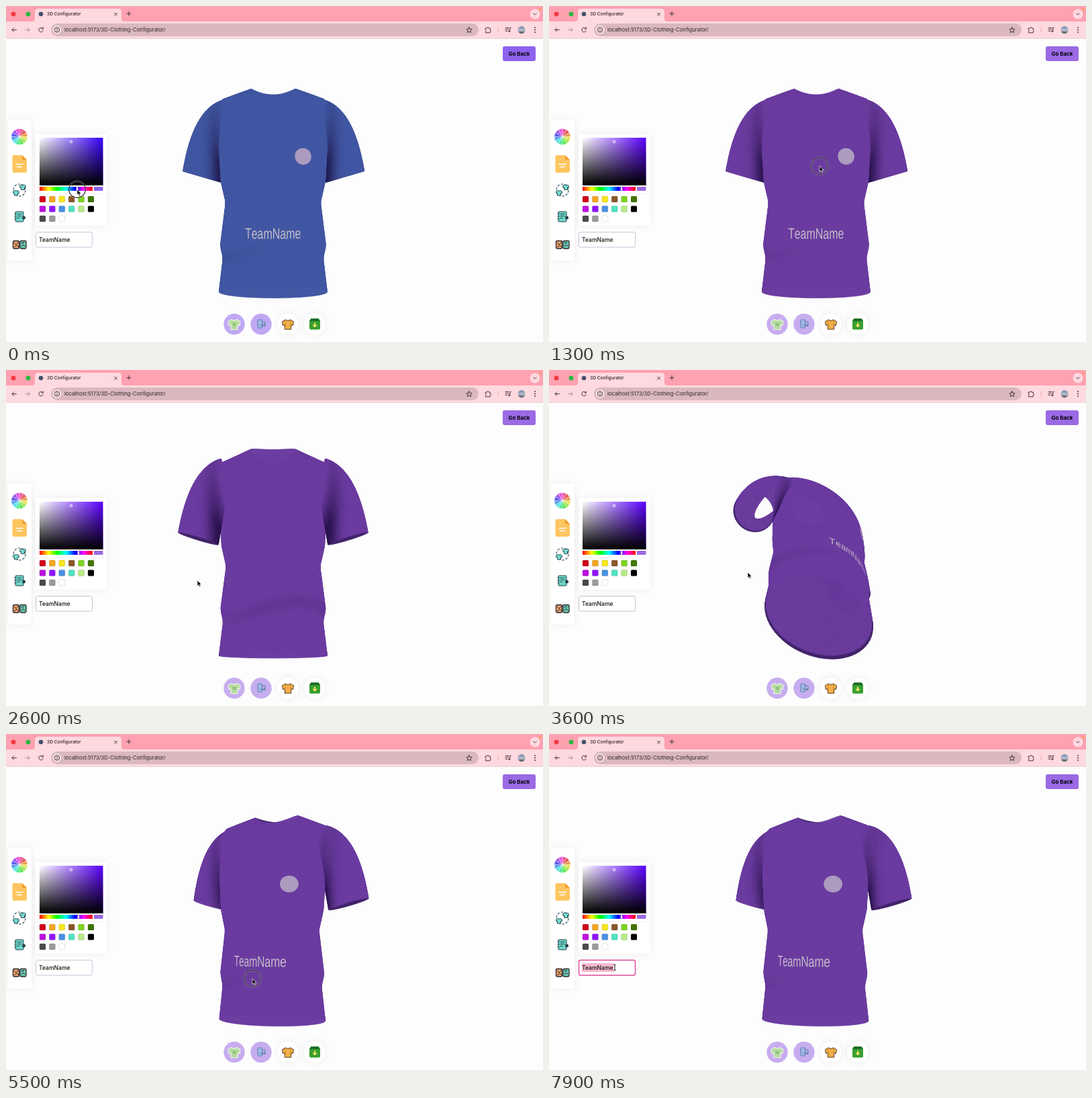
Write an HTML page with a canvas that moves like this. It is 800 px wide and 500 px high and loops after 8000 ms.

```html
<!DOCTYPE html>
<html lang="en">
<head>
<meta charset="utf-8">
<title>3D Configurator</title>
<style>
  html, body { margin: 0; width: 100%; height: 100%; overflow: hidden; background: #fdfdfd; }
  canvas, svg { position: absolute; left: 0; top: 0; width: 800px; height: 500px; }
  svg { font-family: Inter, Roboto, sans-serif; }
  .line { fill: none; stroke: #4a3438; stroke-linecap: round; stroke-linejoin: round; }
  .card { fill: #fff; filter: drop-shadow(0 0 5px rgba(0, 0, 0, .07)); }
  .theme { fill: var(--theme); }
</style>
</head>
<body>
<canvas id="stage" width="800" height="500"></canvas>
<svg viewBox="0 0 800 500" xmlns="http://www.w3.org/2000/svg">
  <defs>
    <linearGradient id="white"><stop stop-color="#fff"/><stop offset="1" stop-color="#fff" stop-opacity="0"/></linearGradient>
    <linearGradient id="black" x2="0" y2="1"><stop stop-opacity="0"/><stop offset="1"/></linearGradient>
    <linearGradient id="hues">
      <stop stop-color="#f00"/><stop offset=".17" stop-color="#ff0"/><stop offset=".33" stop-color="#0f0"/>
      <stop offset=".5" stop-color="#0ff"/><stop offset=".67" stop-color="#00f"/><stop offset=".83" stop-color="#f0f"/>
      <stop offset="1" stop-color="#f00"/>
    </linearGradient>
    <linearGradient id="photo" x2="0" y2="1"><stop stop-color="#6f86a8"/><stop offset=".55" stop-color="#b9c0cc"/><stop offset="1" stop-color="#3c4350"/></linearGradient>
    <path id="tee" d="M-4-7L-9-4-8 2-5 1V8H5V1L8 2 9-4 4-7Q0-4-4-7Z"/>
  </defs>

  <!-- browser -->
  <rect width="800" height="24" fill="#fea1b1"/>
  <rect y="23" width="800" height="25.5" fill="#fed9df"/>
  <rect y="48.2" width="800" height=".8" fill="#e4ccd1"/>
  <path d="M39 23Q43 23 43 19V9Q43 4 48 4H167Q172 4 172 9V19Q172 23 176 23Z" fill="#fed9df"/>
  <circle cx="11" cy="12" r="3.5" fill="#f03c40"/>
  <circle cx="22" cy="12" r="3.5" fill="#f7a4a6"/>
  <circle cx="33" cy="12" r="3.5" fill="#2cb83f"/>
  <circle cx="52" cy="12" r="3.3" fill="#43506a"/>
  <text x="61" y="14.4" font-size="6.6" font-weight="500" fill="#2b2023">3D Configurator</text>
  <path class="line" d="M161.5 10.2l4 4m0-4l-4 4M180 11.5h6m-3-3v6"/>
  <circle cx="788" cy="12" r="7.5" fill="#fed9df"/>
  <path class="line" d="M785.8 11l2.2 2.2 2.2-2.2"/>
  <circle cx="796" cy="5" r="1.5" fill="#f4a13e"/>
  <rect x="67" y="26" width="637" height="19" rx="9.5" fill="#dab8bf"/>
  <path class="line" d="M15.5 35.5H9m3-3-3 3 3 3"/>
  <path class="line" d="M28.5 35.5H35m-3-3 3 3-3 3" opacity=".45"/>
  <path class="line" d="M54.8 33.5a3.3 3.3 0 1 0 .5 3M55.3 31.8v2.2h-2.3"/>
  <circle cx="76" cy="35.5" r="6.5" fill="#f3dde1"/>
  <circle class="line" cx="76" cy="35.5" r="3.6"/>
  <path class="line" d="M76 35.2v2M76 33.5v.1"/>
  <text x="87" y="38.3" font-size="7.7" fill="#30262a">localhost:5173/3D-Clothing-Configurator/</text>
  <path class="line" d="M690 31.6l1.2 2.7 2.9.3-2.2 2 .7 2.9-2.6-1.5-2.6 1.5.7-2.9-2.2-2 2.9-.3z"/>
  <path class="line" d="M714.5 33h2.3a1.2 1.2 0 1 1 2.4 0h2v2.4a1.2 1.2 0 1 1 0 2.4v2h-6.7v-2a1.3 1.3 0 0 0 0-2.5z"/>
  <rect x="732.6" y="31" width="1" height="9" fill="#f5a9b5"/>
  <path class="line" d="M744 32.5h5m-5 2.4h5m-5 2.4h2.7M750.8 37.6v-5.3h1.6"/>
  <circle cx="749.7" cy="37.7" r="1.3" fill="#4a3438"/>
  <circle cx="768" cy="35.5" r="5.6" fill="url(#photo)"/>
  <path class="line" stroke-width="2" d="M788 32v0M788 35.5v0M788 39v0"/>

  <rect class="theme" x="740" y="60" width="49" height="22" rx="3"/>
  <text x="764.4" y="74" font-size="7.9" font-weight="700" text-anchor="middle">Go Back</text>

  <!-- tool bar -->
  <rect class="card" x="3" y="169" width="35" height="210" rx="4"/>
  <g id="wheel" stroke="#fff" stroke-width=".4"></g>
  <path d="M12 222H24L31 229V245Q31 248 28 248H12Q9.500 248 9.500 245V225Q9.500 222 12 222Z" fill="#fdc55f"/>
  <path d="M24 222L31 229H26Q24 229 24 227Z" fill="#f29b2c"/>
  <path d="M15 235.500H25M16.500 239.500H23" stroke="#fff" stroke-width="1.7" stroke-linecap="round"/>
  <circle cx="20" cy="274" r="9" fill="none" stroke="#37555f" stroke-width="1.2" stroke-dasharray="3.5 2.2"/>
  <g fill="#72dccd" stroke="#24404b" stroke-width="1.8">
    <use href="#tee" transform="translate(15 278) scale(.5)"/><use href="#tee" transform="translate(25 269.5) scale(.5)"/>
  </g>
  <rect x="14" y="306" width="12" height="15" rx="1" fill="#6fd8c8" stroke="#23414d"/>
  <path d="M16.500 309.500h7m-7 3h7m-7 3h4M12.500 309h3m-3 4h3m-3 4h3" stroke="#23414d"/>
  <circle cx="26.5" cy="315" r="2.5" fill="#23414d"/>
  <rect x="10.5" y="349.5" width="9" height="11.5" rx="1.5" fill="#e9a36e" stroke="#2a2529" stroke-width="1.3"/>
  <rect x="21" y="349.5" width="9" height="11.5" rx="1.5" fill="#69c8b1" stroke="#2a2529" stroke-width="1.3"/>
  <path d="M12 352l3 3 4-4m-7 8l4-3 3 3M23 358l2.500-3 3 3M23 352.500h4" fill="none" stroke="#2a2529"/>

  <!-- colour picker -->
  <rect class="card" x="44" y="190.5" width="107" height="136.5" rx="3"/>
  <g id="field-colour">
    <rect x="50" y="196" width="94.5" height="71" fill="var(--hue)"/>
    <rect x="50" y="196" width="94.5" height="71" fill="url(#white)"/>
    <rect x="50" y="196" width="94.5" height="71" fill="url(#black)"/>
  </g>
  <circle cx="97" cy="202" r="1.7" fill="none" stroke="#fff"/>
  <rect x="50" y="269" width="79" height="6" fill="url(#hues)"/>
  <rect class="theme" x="131" y="269" width="13.5" height="6" rx="1"/>
  <rect id="knob" y="269.3" width="2.4" height="5.4" rx=".6" fill="#fff" stroke="#777" stroke-width=".3"/>
  <rect x="44" y="279" width="107" height=".7" fill="#eee"/>
  <g id="presets"></g>

  <rect id="field" x="44.5" y="336.5" width="84" height="22.5" rx="2.5" fill="#fff"/>
  <rect id="selection" x="49" y="341" width="47.5" height="13" fill="#f8bad2"/>
  <text x="49" y="350.7" font-size="8.6" font-weight="500" fill="#111">TeamName</text>

  <!-- bottom buttons -->
  <g opacity=".54"><circle class="theme" cx="340" cy="473.5" r="15.7"/><circle class="theme" cx="380" cy="473.5" r="15.7"/></g>
  <circle class="card" cx="420" cy="473.5" r="15.7"/><circle class="card" cx="460" cy="473.5" r="15.7"/>
  <use href="#tee" transform="translate(340 473.5)" fill="#b4dc9c" stroke="#eef4e8" stroke-width="1.2"/>
  <text x="340" y="475.5" font-size="5" text-anchor="middle" fill="#4c7a44">10</text>
  <rect x="375" y="467" width="6.5" height="12" rx="1" fill="#a2b9e4" stroke="#587cae"/>
  <path d="M381 470h5v6h-4m-4-1h8m-2-2 2 2-2 2" fill="none" stroke="#54839c"/>
  <use href="#tee" transform="translate(420 473.5) scale(.95)" fill="#f3b04a" stroke="#4a3524"/>
  <path d="M416 467v13m8-13v13" stroke="#c9791a" stroke-width=".8"/>
  <path d="M454.500 465h11l2.500 4v10.500q0 2-2 2h-12q-2 0-2-2V469z" fill="#37a02f"/>
  <path d="M454.500 465h11l2.500 4h-16z" fill="#1f6e25"/>
  <path d="M460 471v6m-2.700-2.500 2.700 2.700 2.700-2.700" fill="none" stroke="#ffe46b" stroke-width="1.7"/>

  <!-- pointer -->
  <g id="pointer">
    <g id="ring" fill="none"><circle r="12.3" stroke="#fff" stroke-width="2.6" opacity=".35"/><circle r="12.3" stroke="#2b2530" stroke-width="1.2"/></g>
    <path id="arrow" d="M0 0V8.500L2 6.700 3.400 9.700 4.900 9 3.500 6.200H6.200Z" fill="#000" stroke="#fff" stroke-width=".7"/>
    <path id="beam" d="M-1.800-4.500Q0-4.500 0-3.300Q0-4.500 1.800-4.500M0-3.500V3.500M-1.800 4.500Q0 4.500 0 3.300Q0 4.500 1.800 4.500" fill="none" stroke="#111" stroke-width=".9"/>
  </g>
</svg>

<script>
const $ = id => document.getElementById(id);
const ctx = $('stage').getContext('2d');
const LOOP = 8000, STEP = 100, TAU = 2 * Math.PI;
const CENTRE = [398, 280], EYE = 1000;
const NECK = 121, HEM = 424;

const lerp = (a, b, k) => a + (b - a) * k;
const mix = (a, b, k) => a.map((v, i) => lerp(v, b[i], k));
const rgb = c => `rgb(${c.map(Math.round)})`;
const bump = (x, size) => Math.exp(-((x / size) ** 2));

// Each beat changes some of the state; the rest carries over.
const beats = [{ t: 0, x: 106, y: 273, down: 1, yaw: -1, tilt: 0 }];
const at = (t, change = {}) => beats.push({ ...beats[beats.length - 1], ...change, t });
at(400, { x: 108, down: 0 });
at(1200, { x: 403, y: 238, down: 1 });
at(1300);
at(1800, { x: 288, yaw: -91, down: 0 });
at(2000, { x: 400, y: 300, down: 1 });
at(2500, { x: 285, y: 313, yaw: -180, tilt: 5, down: 0 });
at(2700);
at(2900, { x: 425, y: 375, down: 1 });
at(3500, { x: 296, y: 301, yaw: -313, tilt: 55, down: 0 });
at(3600);
at(3800, { x: 425, y: 330, down: 1 });
at(4300, { x: 349, y: 340, yaw: -372, tilt: 38 });
at(5500, { x: 367, y: 364, yaw: -379, tilt: 0 });
at(5800, { yaw: -378, down: 0 });
at(6000);
at(6900, { x: 98, y: 347.5 });
at(7200, { down: 1 });
at(7300, { down: 0 });
at(LOOP);

function stateAt(t) {
  const i = beats.findIndex(b => b.t > t), a = beats[i - 1], b = beats[i];
  const k = (t - a.t) / (b.t - a.t), e = k * k * (3 - 2 * k);
  const s = { down: a.down };
  for (const key of ['x', 'y', 'yaw', 'tilt']) s[key] = lerp(a[key], b[key], e);
  return s;
}

// Half width of the torso at a few heights.
const waist = [[NECK, 34], [140, 80], [212, 80], [262, 77], [292, 70], [356, 78], [374, 74], [HEM + 1, 80]];

function torsoRing(y) {
  const i = Math.max(1, waist.findIndex(p => p[0] > y));
  const [y0, w0] = waist[i - 1], [y1, w1] = waist[i];
  const neck = Math.exp((NECK - y) / 30);
  return { w: lerp(w0, w1, (y - y0) / (y1 - y0)), d: 62 - 38 * neck, z: 6 - 24 * neck };
}

// Surfaces take an angle and a position from top to hem; they return x, y, z, shade.
function torso(a, v) {
  const y = lerp(NECK, HEM, v), r = torsoRing(y), s = Math.sin(a);
  const dip = Math.max(0, 1 - (y - NECK) / 30) * s * s * (s > 0 ? 12 : 5);
  const fold = bump(y - 358 - 12 * Math.cos(2 * a + 1), 9) * (.5 - .5 * Math.sin(a + .6));
  return [r.w * Math.cos(a), y + dip, r.z + r.d * s, .14 * fold];
}

const sleeve = side => (a, v) => {
  const out = side * Math.cos(a), u = 1 - v;
  const outer = [76 * u * u + 244 * u * v + 138 * v * v, 137 * u * u + 298 * u * v + 245 * v * v];
  const inner = [lerp(70, 80, v), lerp(200, 262, v)];
  const [x, y] = mix(inner, outer, (1 + out) / 2);
  const shade = .75 * bump(x - 78, 14) * Math.min(1, 1.6 * v);
  return [side * x, y, -24 + lerp(45, 31, v) * Math.sin(a), shade];
};

function camera({ yaw, tilt }) {
  const [cy, sy, ct, st] = [yaw, tilt].flatMap(d => [Math.cos(d * TAU / 360), Math.sin(d * TAU / 360)]);
  return ([x, y, z]) => {
    const h = y - CENTRE[1], depth = z * cy - x * sy;
    const near = h * st + depth * ct, s = EYE / (EYE - near);
    return [CENTRE[0] + (x * cy + z * sy) * s, CENTRE[1] + (h * ct - depth * st) * s, near];
  };
}

function faces(surface, cols, rows, darkRows, view) {
  const grid = Array.from({ length: rows + 1 }, (_, r) => Array.from({ length: cols + 1 }, (_, c) => {
    const p = surface(c / cols * TAU, r / rows);
    return [...view(p), p[3]];
  }));
  const list = [];
  for (let r = 0; r < rows; r++)
    for (let c = 0; c < cols; c++) {
      const q = [grid[r][c], grid[r][c + 1], grid[r + 1][c + 1], grid[r + 1][c]];
      const [ax, ay, bx, by] = [q[2][0] - q[0][0], q[2][1] - q[0][1], q[3][0] - q[1][0], q[3][1] - q[1][1]];
      const inside = ax * by - ay * bx > 0;
      const edge = r < darkRows || r === rows - 1;
      const shade = inside ? (edge ? .5 : .05) : (q[0][3] + q[2][3]) / 2;
      list.push({ q, shade, depth: q.reduce((sum, p) => sum + p[2], 0) });
    }
  return list;
}

function drawMesh(view, colour) {
  const list = [
    ...faces(torso, 64, 52, 2, view),
    ...faces(sleeve(-1), 40, 22, 0, view),
    ...faces(sleeve(1), 40, 22, 0, view)
  ].sort((a, b) => a.depth - b.depth);
  ctx.lineWidth = .7;
  for (const { q, shade } of list) {
    ctx.fillStyle = ctx.strokeStyle = rgb(mix(colour, [20, 5, 50], shade));
    ctx.beginPath();
    for (const p of q) ctx.lineTo(p[0], p[1]);
    ctx.closePath();
    ctx.fill();
    ctx.stroke();
  }
}

// Runs paint() in the plane that touches the chest at x, y.
function onChest(view, x, y, paint) {
  const point = (px, py) => {
    const r = torsoRing(py);
    return view([px, py, r.z + r.d * Math.sqrt(1 - (px / r.w) ** 2)]);
  };
  const o = point(x, y), u = point(x + 1, y), v = point(x, y + 1);
  const [ux, uy, vx, vy] = [u[0] - o[0], u[1] - o[1], v[0] - o[0], v[1] - o[1]];
  if (ux * vy - uy * vx <= 0) return;
  ctx.save();
  ctx.setTransform(ux, uy, vx, vy, o[0], o[1]);
  paint();
  ctx.restore();
}

function drawPrints(view) {
  ctx.fillStyle = '#ad9bbf';
  onChest(view, 43, 227, () => {
    ctx.beginPath();
    ctx.arc(0, 0, 11.7, 0, TAU);
    ctx.fill();
  });
  const word = 'TeamName', squeeze = .71;
  ctx.font = '21px "Liberation Sans", Arial, sans-serif';
  ctx.textAlign = 'center';
  ctx.fillStyle = '#c4bcc9';
  let x = -ctx.measureText(word).width / 2;
  for (const letter of word) {
    const w = ctx.measureText(letter).width;
    onChest(view, (x + w / 2) * squeeze, 334.5, () => {
      ctx.scale(squeeze, 1);
      ctx.fillText(letter, 0, 7.5);
    });
    x += w;
  }
}

function drawColours(k) {
  const root = document.documentElement.style;
  root.setProperty('--theme', rgb(mix([141, 98, 238], [155, 106, 228], k)));
  root.setProperty('--hue', rgb(mix([58, 0, 255], [92, 0, 255], k)));
  $('knob').setAttribute('x', 104.8 + 2 * k);
}

function drawPointer({ x, y, down }, t) {
  const typing = x > 44 && x < 129 && y > 336 && y < 359;
  const focused = t >= 7200;
  $('pointer').setAttribute('transform', `translate(${x} ${y})`);
  $('ring').style.opacity = down;
  $('arrow').style.opacity = +!typing;
  $('beam').style.opacity = +typing;
  $('field').setAttribute('stroke', focused ? '#dc4b9c' : '#c6c3d6');
  $('field').setAttribute('stroke-width', focused ? 1.4 : 1);
  $('selection').style.opacity = +(t >= 7300);
}

function buildPanels() {
  const colours = 'd0021b f5a623 f8e71c 8b572a 7ed321 417505 bd10e0 9013fe 4a90e2 50e3c2 b8e986 000 4a4a4a 9b9b9b fff';
  $('presets').innerHTML = colours.split(' ').map((c, i) =>
    `<rect x="${50 + i % 6 * 14.4}" y="${283 + (i / 6 | 0) * 14.5}" width="9" height="9" rx="1.5" fill="#${c}"
      stroke="#000" stroke-opacity=".2" stroke-width=".6"/>`).join('');
  const rim = i => [20 + 12 * Math.sin(i * TAU / 12), 194.5 - 12 * Math.cos(i * TAU / 12)];
  $('wheel').innerHTML = Array.from({ length: 12 }, (_, i) =>
    `<path d="M20 194.5L${rim(i)}A12 12 0 0 1 ${rim(i + 1)}Z" fill="hsl(${i * 30 - 30} 75% 63%)"/>`).join('');
}

let shown = -1;
function tick() {
  const t = Math.floor(performance.now() % LOOP / STEP) * STEP;
  if (t !== shown) {
    shown = t;
    const state = stateAt(t), view = camera(state), k = Math.min(1, t / 400);
    ctx.clearRect(0, 0, 800, 500);
    drawMesh(view, mix([65, 87, 163], [107, 60, 160], k));
    drawPrints(view);
    drawColours(k);
    drawPointer(state, t);
  }
  requestAnimationFrame(tick);
}

buildPanels();
tick();
</script>
</body>
</html>
```
